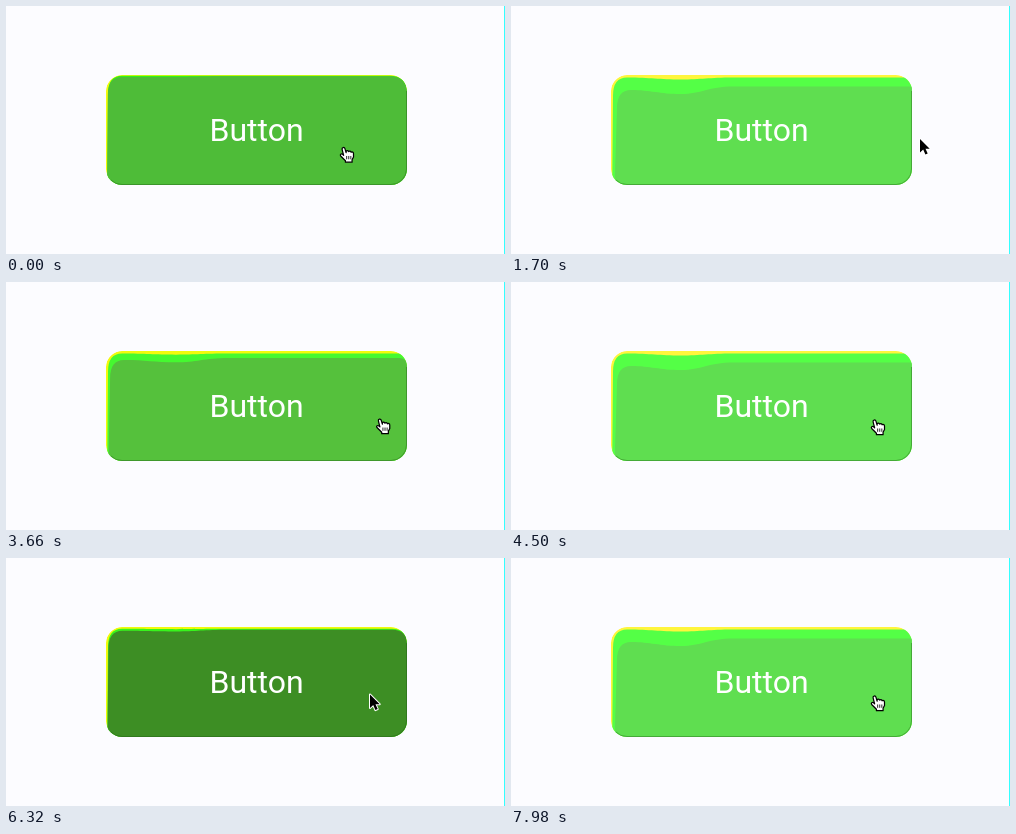
An HTML page with a canvas that plays this animation: 499 px wide and 248 px high, repeating every 8 s.

```html
<!DOCTYPE html>
<html lang="en">
<head>
<meta charset="utf-8">
<title>Button hover</title>
<style>
  html, body { margin: 0; width: 100%; height: 100%; overflow: hidden; background: #fcfcff; }
  canvas { display: block; }
</style>
</head>
<body>
<canvas id="stage" width="499" height="248"></canvas>
<script>
const ctx = document.getElementById('stage').getContext('2d');
const LOOP = 8000;
const BOX = { x: 100, y: 69, w: 301, h: 110, r: 16 };

// Each look: red, green, blue of the face, then height of the wavy highlight.
const START = [78, 188, 56, 0.03];
const REST = [78, 174, 46, 0.27];
const HOVER = [95, 222, 80, 1];
const PRESSED = [61, 142, 36, 0.17];

const looks = [
  [20, START], [820, HOVER], [1700, HOVER], [2500, REST],
  [3340, REST], [4080, HOVER], [5020, HOVER], [5900, PRESSED],
  [6840, PRESSED], [7580, HOVER]
];
const pointer = [
  [20, [338, 140]], [1100, [338, 140]], [1700, [409, 133]], [2300, [423, 131]],
  [3000, [423, 131]], [3900, [364, 136.5]]
];

const ease = p => p * p * (3 - 2 * p);

function sample(keys, time) {
  const next = keys.findIndex(([t]) => t > time);
  if (next === 0) return keys[0][1];
  if (next < 0) return keys[keys.length - 1][1];
  const [t0, from] = keys[next - 1];
  const [t1, to] = keys[next];
  const p = ease((time - t0) / (t1 - t0));
  return from.map((v, i) => v + (to[i] - v) * p);
}

function fillPath(path, color) {
  ctx.fillStyle = color;
  ctx.fill(path);
}

// A face whose top edge swells on the left and runs flat to the right.
function wavyFace(inset, left, dip, right, corner) {
  const x = BOX.x + inset;
  const p = new Path2D();
  p.moveTo(BOX.x + inset * 0.6, 180);
  p.lineTo(x, left + 18);
  p.quadraticCurveTo(x, left, x + 14, left);
  p.bezierCurveTo(140, left, 148, dip, 170, dip);
  p.bezierCurveTo(190, dip, 198, right, 222, right);
  p.lineTo(401 - corner, right);
  p.quadraticCurveTo(401, right, 401, right + corner);
  p.lineTo(401, 180);
  p.closePath();
  return p;
}

const outline = new Path2D();
outline.roundRect(BOX.x, BOX.y, BOX.w, BOX.h, BOX.r);
const rim = new Path2D('M105 174 A15 15 0 0 0 116 178.5 H385 A15.5 15.5 0 0 0 400.5 163 V85');
const arrow = new Path2D('M0 0 V13.5 L3.2 10.6 L5.4 15.6 L7.7 14.6 L5.5 9.7 H9.7 Z');
const hand = new Path2D(
  'M-2 3.5 C-2.4 1.4 .4 .8 1 2.8 L2.2 7 V5.8 C2.8 4.4 4.6 4.7 4.9 6 ' +
  'C5.5 4.9 7.2 5.2 7.5 6.6 C8.5 5.8 10 6.5 10 8 V11.5 L8.5 14.5 V17 H1.5 V15.5 ' +
  'L-3.5 10.5 C-4.6 9 -2.8 7.8 -1.5 8.8 L-.4 9.8 Z'
);
const fingers = new Path2D('M2.8 10.5 V14 M5 10.5 V14 M7.2 10.5 V14');

function drawButton([r, g, b, wave]) {
  const glow = Math.min(1, wave * 4);
  const corner = 18 * (1 - wave);
  ctx.save();
  ctx.clip(outline);
  fillPath(outline, wave > 0.6 ? '#fff53c' : '#f2fa0c');
  fillPath(
    wavyFace(2, 69.5 + 2 * glow, 69.5 + 2 * glow + 2 * wave, 69.5 + 2 * glow, corner),
    `rgb(${50 + 34 * wave}, ${242 + 13 * wave}, ${20 + 50 * wave})`);
  fillPath(
    wavyFace(1.7 + 4.3 * wave, 70.5 + 13.5 * wave, 70.5 + 17.5 * wave, 70 + 10.5 * wave, corner),
    `rgb(${r}, ${g}, ${b})`);
  ctx.strokeStyle = 'rgba(30, 90, 20, .4)';
  ctx.lineWidth = 1;
  ctx.stroke(rim);
  ctx.restore();

  ctx.font = '32px Roboto, sans-serif';
  ctx.textAlign = 'center';
  ctx.fillStyle = '#fff';
  ctx.fillText('Button', 250.5, 135);
}

function drawPointer([x, y], isHand) {
  ctx.save();
  ctx.translate(x, y);
  ctx.lineJoin = 'round';
  ctx.strokeStyle = isHand ? '#000' : '#fff';
  ctx.lineWidth = isHand ? 1.3 : 2;
  const shape = isHand ? hand : arrow;
  if (isHand) {
    ctx.scale(0.95, 0.95);
    fillPath(shape, '#fff');
  }
  ctx.stroke(shape);
  if (isHand) {
    ctx.lineWidth = 0.9;
    ctx.stroke(fingers);
  } else {
    fillPath(shape, '#000');
  }
  ctx.restore();
}

function draw(time) {
  ctx.fillStyle = '#fcfcff';
  ctx.fillRect(0, 0, 499, 248);
  ctx.fillStyle = '#3ff';
  ctx.fillRect(498, 0, 1, 248);

  drawButton(sample(looks, time));
  const at = sample(pointer, time);
  const held = time >= 5860 && time < 6840;
  drawPointer(at, at[0] < BOX.x + BOX.w && !held);
}

const begin = performance.now();
function tick() {
  draw((performance.now() - begin) % LOOP);
  requestAnimationFrame(tick);
}
tick();
</script>
</body>
</html>
```
